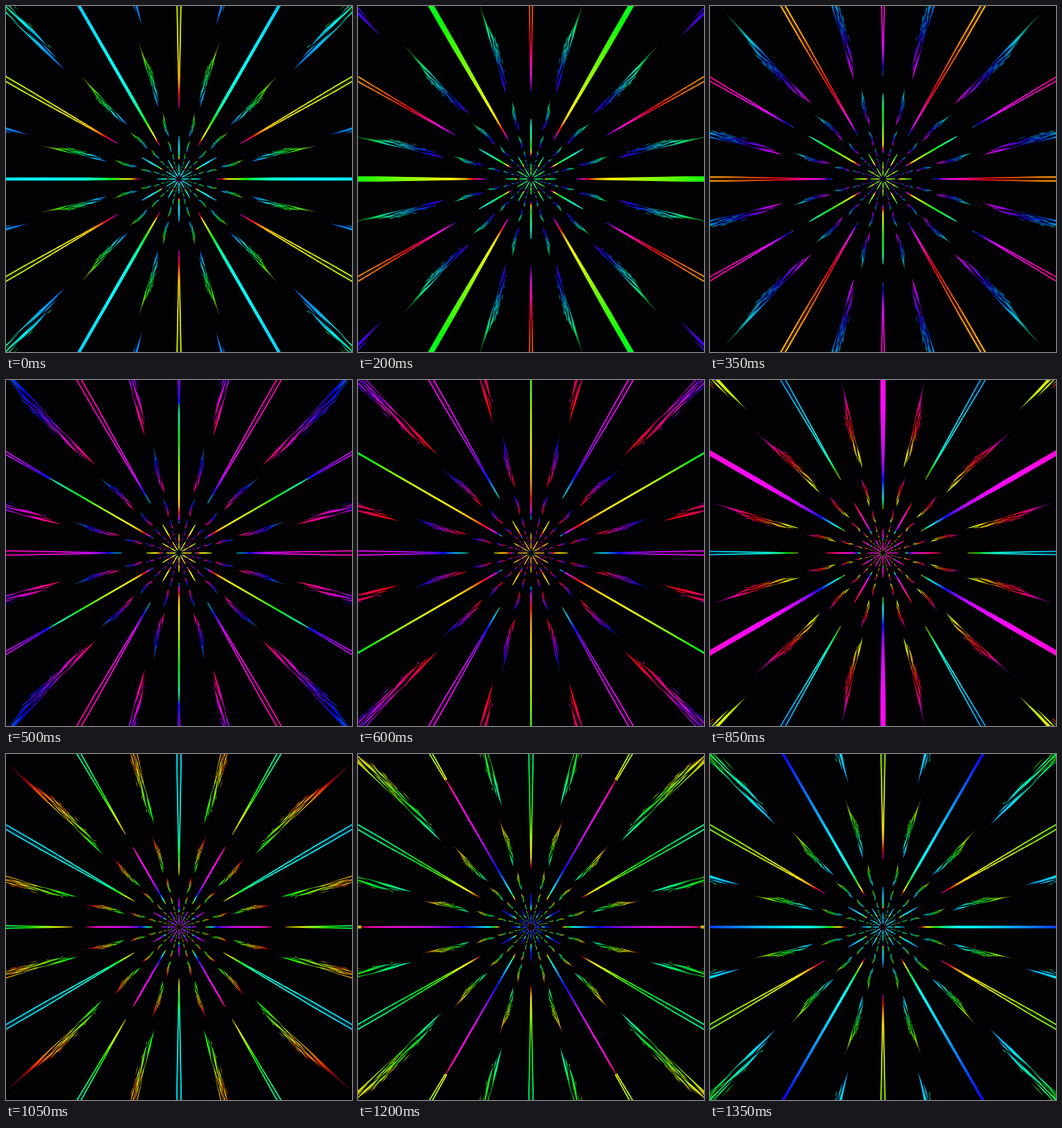
Recreate the animation shown at these times as an HTML page with a canvas. Size 498 px wide and 498 px high, loop 1400 ms.

```html
<!DOCTYPE html>
<html>
<head>
<meta charset="utf-8">
<style>
html, body { margin: 0; width: 100%; height: 100%; overflow: hidden; background: #020104; }
canvas { display: block; }
</style>
</head>
<body>
<canvas id="stage" width="498" height="498"></canvas>
<script>
const ctx = document.getElementById('stage').getContext('2d');
const CYCLE = 29;              // travel per loop, in steps
const STEP = 50, LOOP = 1400;  // ms
const TURN = 360 / CYCLE;      // hue change per step
const EDGE = 350;
const DEG = Math.PI / 180;

const clamp = (v, lo, hi) => Math.min(hi, Math.max(lo, v));
const depth = r => 1 / Math.sqrt(r);
const radius = u => 1 / (u * u);
const hsl = (h, l = 50) => `hsl(${h},100%,${l}%)`;
// Draws hues towards yellow, cyan and magenta
const vivid = h => h + 11 * Math.sin(3 * h * DEG);

function random(seed) {
  return () => {
    seed = (seed * 16807) % 2147483647;
    return seed / 2147483647;
  };
}

// Far end and near tip of a beam at its own age
const beamStart = age => radius(Math.max(0.045, 0.1347 - age * (age < 0 ? 0.004 : 0.00245)));
const beamTip = age => age < -0.5 ? 855 / (-0.5 - age) : Infinity;

function drawBeam(age, time) {
  const start = beamStart(age), tip = beamTip(age);
  const nextTip = Math.min(EDGE, beamTip(age - CYCLE));
  const from = age > 0 ? Math.max(start, nextTip) : start;
  const to = Math.min(EDGE, tip);
  const far = depth(start), near = tip === Infinity ? 0 : depth(tip);
  const range = 155 + 95 / (1 + Math.exp((age - 5.5) / 1.2));
  const tail = 90 * Math.exp((Math.min(age, 0) + 4.5) / 5);
  const cap = clamp(2.2 + 0.4 * age, 1.2, 3.8);
  for (let r = from; r < to; r += 1.5) {
    const f = Math.max(0, (far - depth(r)) / (far - near));
    const hue = vivid(305 + range * (1 - Math.exp(-f / 0.2)) + tail * f ** 4 - TURN * time);
    const half = Math.min(cap, 0.7 + 0.02 * (r - start), 0.45 + r * 0.017, 0.4 + (tip - r) * 0.05);
    ctx.fillStyle = hsl(hue, Math.min(52, 28 + 300 * f));
    ctx.fillRect(r, -half, 2, half * 2);
    const hole = Math.min(half - 1.6, (age - 4) * 0.6);
    if (hole > 0) {
      ctx.fillStyle = age < 8 ? hsl(hue - 25, 12 * (8 - age) / 4) : '#020104';
      ctx.fillRect(r, -hole, 2, hole * 2);
    }
  }
}

// Each feather is a bundle of thin blades; position 0 is its far end, 1 its near end
const rnd = random(77);
const blades = [
  { a: 0, b: 0.45, angle: 1.35, width: 0.9 },
  { a: 0.5, b: 1, angle: 1.4, width: 0.6 }
];
for (let i = 0; i < 18; i++) {
  const a = 0.03 + 0.04 * i;
  const b = a + 0.14 + rnd() * 0.1;
  blades.push({ a, b, angle: 1.4 - 2.2 * rnd() * Math.sin(Math.PI * (a + b) / 2), width: 0.55 });
}
for (let i = 0; i < 22; i++) {
  const a = 0.1 + rnd() * 0.68;
  blades.push({ a, b: a + 0.03 + rnd() * 0.06, angle: 0.9 - rnd() * 2.4, width: 0.35 });
}

function drawFeather(age, time, side) {
  const far = 0.1276 - 0.0021 * age;
  const at = f => radius(Math.max(0.04, far - 0.0274 * f));
  if (far < depth(EDGE)) return;
  const point = (r, angle, shift = 0) =>
    ctx.lineTo(r * Math.cos(angle), r * Math.sin(angle) + shift);
  const paint = (shift, light) => {
    const fill = ctx.createLinearGradient(at(0), 0, at(1), 0);
    for (let f = 0; f <= 1; f += 0.125) {
      const stop = (at(f) - at(0)) / (at(1) - at(0));
      fill.addColorStop(stop, hsl(215 + TURN * time - shift - (155 - shift) * f ** 1.5, light));
    }
    return fill;
  };
  const bladePaint = paint(0, 48), dashPaint = paint(55, 36);
  for (const { a, b, angle, width } of blades) {
    const r0 = at(a), r1 = at(b), mid = at((a + b) / 2);
    if (r0 > EDGE || (mid < 30 && width < 0.5)) continue;
    const d = angle * side * DEG;
    const half = width * (0.25 + mid * 0.0052);
    ctx.fillStyle = width < 0.5 ? dashPaint : bladePaint;
    ctx.beginPath();
    point(r0, d);
    point(mid, d, half);
    point(r1, d);
    point(mid, d, -half);
    ctx.fill();
  }
}

function draw(time) {
  ctx.setTransform(1, 0, 0, 1, 0, 0);
  ctx.fillStyle = '#020104';
  ctx.fillRect(0, 0, 498, 498);
  for (let i = 0; i < 12; i++) {
    ctx.setTransform(1, 0, 0, 1, 249, 249);
    ctx.rotate((15 + 30 * i) * DEG);
    ctx.scale(1, i % 2 ? 1 : -1);
    for (let k = -8; k <= 2; k++) drawFeather(time + k * CYCLE / 2, time, k % 2 ? 1 : -1);

    ctx.setTransform(1, 0, 0, 1, 249, 249);
    ctx.rotate(30 * i * DEG);
    const age = (time + (i % 2) * CYCLE / 2) % CYCLE;
    for (let k = 0; k < 5; k++) drawBeam(age - k * CYCLE, time);
  }
}

let last = -1;
function tick() {
  const n = Math.floor((performance.now() % LOOP) / STEP);
  if (n !== last) {
    last = n;
    draw(n < 16 ? n : n + 1);  // the travel skips one step here
  }
  requestAnimationFrame(tick);
}
tick();
</script>
</body>
</html>
```
